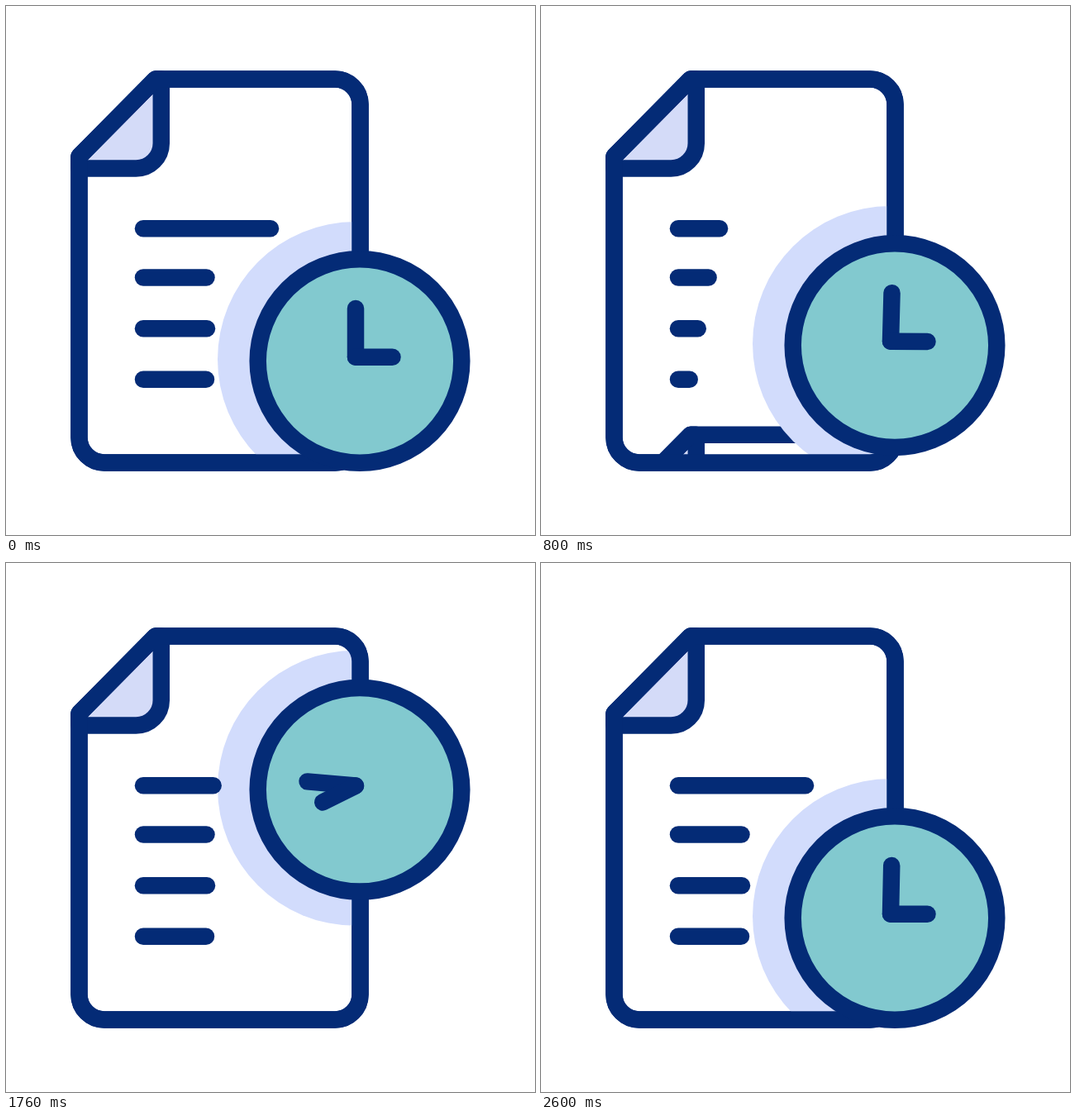
Write an HTML page with a canvas that moves like this. It is 640 px wide and 640 px high and loops after 3000 ms.

```html
<!DOCTYPE html>
<html lang="en">
<head>
<meta charset="utf-8">
<title>Document with clock</title>
<style>
html, body { margin: 0; height: 100%; overflow: hidden; background: #fff; }
canvas { display: block; width: 100vw; height: 100vh; }
</style>
</head>
<body>
<canvas width="640" height="640"></canvas>
<script>
const ctx = document.querySelector('canvas').getContext('2d');
const NAVY = '#042b76', TEAL = '#82c9cf', LILAC = '#d2dcfc', FOLD = '#d4dbf8';

const sheet = new Path2D('M88.5 182L181 88.5H398a30.5 30.5 0 0 1 30.5 30.5V522a30.5 30.5 0 0 1-30.5 30.5H119a30.5 30.5 0 0 1-30.5-30.5Z');
const fold = new Path2D('M181 88.5H187.8V166a30.5 30.5 0 0 1-30.5 30.5H88.5V182Z');

// Text lines: y, right end, start of regrowth
const lines = [[269.3, 243, 344], [328.6, 242.5, 396], [390.2, 243, 451], [451.8, 242, 508]];
const LEFT = 166, LONG = 320, SHORT = 243;
const SLIDE = 310, SLIDE_TIME = 665;

// Turn of each hand in degrees: time, angle
const minuteKeys = [[560, 0], [800, 1.5], [1120, 42], [1760, 275], [2200, 351.5], [2600, 361.2]];
const hourKeys = [[760, 0], [1120, 12.7], [1760, 153.4], [2200, 332.4], [2600, 360]];

// Cubic ease in and out from 0 to 1
function ease(t, start, time) {
  const s = Math.min(1, Math.max(0, (t - start) / time));
  return s < 0.5 ? 4 * s ** 3 : 1 - 4 * (1 - s) ** 3;
}

// Smooth monotone curve through rising keys
function curve(keys, t) {
  const last = keys.length - 1;
  if (t <= keys[0][0]) return keys[0][1];
  if (t >= keys[last][0]) return keys[last][1];
  const rise = i => (keys[i + 1][1] - keys[i][1]) / (keys[i + 1][0] - keys[i][0]);
  const slope = i => {
    if (i === 0 || i === last) return 0;
    const a = rise(i - 1), b = rise(i);
    return 2 * a * b / (a + b);
  };
  const i = keys.findIndex(k => k[0] > t) - 1;
  const [t0, a] = keys[i], [t1, b] = keys[i + 1];
  const d = t1 - t0, s = (t - t0) / d, r = 1 - s;
  return a * r * r * (1 + 2 * s) + b * s * s * (3 - 2 * s)
    + d * s * r * (slope(i) * r - slope(i + 1) * s);
}

function disc(x, y, r, color) {
  ctx.beginPath();
  ctx.arc(x, y, r, 0, 7);
  ctx.fillStyle = color;
  ctx.fill();
}

function bar(x0, y0, x1, y1) {
  ctx.beginPath();
  ctx.moveTo(x0, y0);
  ctx.lineTo(x1, y1);
  ctx.stroke();
}

function page() {
  ctx.fillStyle = '#fff';
  ctx.fill(sheet);
  ctx.fillStyle = FOLD;
  ctx.fill(fold);
  ctx.stroke(fold);
  ctx.stroke(sheet);
}

function shifted(dy, paint) {
  ctx.save();
  ctx.translate(0, dy);
  paint();
  ctx.restore();
}

function oldLines(t) {
  lines.forEach(([y, end], i) => {
    const right = i ? end : LONG + (SHORT - LONG) * ease(t, 300, 360);
    bar(LEFT, y, right, y);
  });
}

function newLines(t) {
  lines.forEach(([y, end, start], i) => {
    const grown = ease(t, start, 820);
    const extra = i ? 0 : (LONG - SHORT) * ease(t, 1480, 960);
    if (grown) bar(LEFT, y, LEFT + (end - LEFT) * grown + extra, y);
  });
}

function hand(length, degrees) {
  const a = degrees * Math.PI / 180;
  bar(423, 424.7, 423 + length * Math.sin(a), 424.7 - length * Math.cos(a));
}

function clock(t) {
  disc(428, 429.5, 123.3, TEAL);
  ctx.stroke();
  hand(58.7, curve(minuteKeys, t));
  hand(44.5, 90 + curve(hourKeys, t));
}

function draw(t) {
  const drop = 464 * ease(t, SLIDE, SLIDE_TIME);
  const lift = -155.3 * (ease(t, 540, 833) - ease(t, 1717, 777));
  const sliding = t < SLIDE + SLIDE_TIME;

  ctx.clearRect(0, 0, 640, 640);
  ctx.strokeStyle = NAVY;
  ctx.lineWidth = 20.5;
  ctx.lineCap = ctx.lineJoin = 'round';
  page();

  ctx.save();
  ctx.clip(sheet);
  if (sliding) {
    newLines(t);
    shifted(drop, page);
  }
  disc(422.5, 427.5 + lift, 166.5, LILAC);
  if (sliding) shifted(drop, () => oldLines(t));
  else newLines(t);
  ctx.restore();

  ctx.stroke(sheet);
  shifted(lift, () => clock(t));
}

function tick() {
  const t = performance.now() % 3000;
  draw(Math.min(2600, Math.floor(t / 40) * 40));
  requestAnimationFrame(tick);
}
tick();
</script>
</body>
</html>
```
